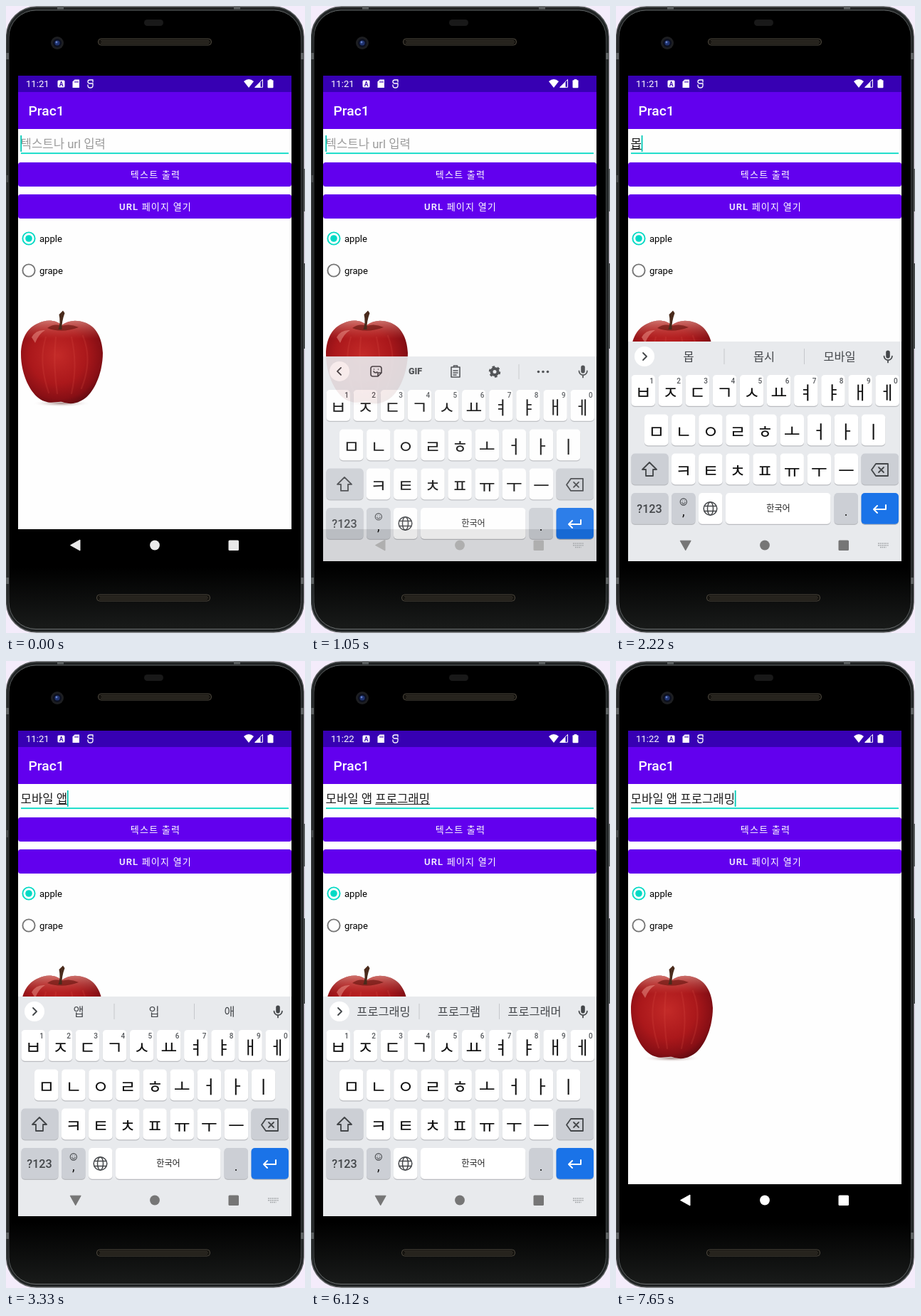
Recreate the animation shown at these times as an HTML page. Size 420 by 882 pixels, loop 8 s.

```html
<!DOCTYPE html>
<html lang="ko">
<head>
<meta charset="utf-8">
<style>
html, body { margin: 0; width: 100%; height: 100%; overflow: hidden; background: #f4ecfb; }
svg { display: block; width: 100%; height: 100%; }
text { font-family: Roboto, "Noto Sans CJK KR", "Noto Sans CJK", sans-serif; white-space: pre; }
.line { fill: none; stroke-linecap: round; stroke-linejoin: round; }
</style>
</head>
<body>
<svg id="stage" viewBox="0 0 420 882" preserveAspectRatio="none"></svg>
<script>
const LOOP = 8000;
const stage = document.getElementById('stage');
const INK = '#434649';

// ---- markup helpers
const rect = (x, y, w, h, fill, r = 0, more = '') =>
  `<rect x="${x}" y="${y}" width="${w}" height="${h}" rx="${r}" fill="${fill}" ${more}/>`;
const disc = (x, y, r, fill, more = '') => `<circle cx="${x}" cy="${y}" r="${r}" fill="${fill}" ${more}/>`;
const ring = (x, y, r, color, w) => disc(x, y, r, 'none', `stroke="${color}" stroke-width="${w}"`);
const line = (d, color = INK, w = 1.8, more = '') =>
  `<path class="line" d="${d}" stroke="${color}" stroke-width="${w}" ${more}/>`;
const shape = (d, fill, more = '') => `<path d="${d}" fill="${fill}" ${more}/>`;
const label = (x, y, size, str, fill = '#000', more = '') =>
  `<text x="${x}" y="${y}" font-size="${size}" fill="${fill}" ${more}>${str}</text>`;
const mid = (x, y, size, str, fill, more = '') => label(x, y, size, str, fill, `text-anchor="middle" ${more}`);
const stops = list => list.map(([at, color, alpha = 1]) =>
  `<stop offset="${at}" stop-color="${color}" stop-opacity="${alpha}"/>`).join('');

function grille(x, y) {
  let out = rect(x, y, 159, 9, '#15130f', 4, 'stroke="#4b463c"');
  for (let i = 0; i < 3; i++)
    out += `<path d="M${x + 4 + i % 2} ${y + 2.5 + i * 2}h151" stroke="#5a5448" stroke-dasharray="1 1"/>`;
  return out;
}

function phone() {
  let out = `<defs><linearGradient id="glass" x2="0" y2="1">${stops([[0, '#000'], [.9, '#000'], [1, '#191b1a']])}</linearGradient>
    <linearGradient id="rim" x2="0" y2="1">${stops([[0, '#5f6364'], [.06, '#3a3e3f'], [.94, '#3a3e3f'], [1, '#6a6e6e']])}</linearGradient></defs>`;
  out += rect(417, 229, 3, 60, '#6b6e70') + rect(417.5, 362, 2.5, 120, '#4b4e50');
  out += rect(.7, 1, 417.3, 880, '#202324', 42, 'stroke="url(#rim)" stroke-width="1.500"');
  out += rect(4, 6, 410.5, 870.5, 'url(#glass)', 38, 'stroke="url(#rim)" stroke-width="1"');
  for (const y of [66, 804]) out += rect(0, y, 4, 9, '#5d6162') + rect(414, y, 4, 9, '#5d6162');
  out += rect(0, 238, 3, 10, '#494d4e') + rect(72, 0.5, 9, 4, '#5d6162') + rect(320, 0.5, 9, 4, '#5d6162');
  out += rect(194, 19, 27, 9, '#191919', 4.5);
  out += disc(72, 52, 9, '#1d1e21') + disc(72, 52, 6, '#0c1020') + disc(72, 52, 3.6, '#20336f') + disc(71, 51, 1.4, '#6480c8');
  return out + grille(129.5, 46) + grille(127.5, 828);
}

function statusBar() {
  return rect(17, 98, 384, 23, '#3700b3') +
    label(28, 114, 13.1, '11:21', '#fff', 'id="clock"') +
    rect(72.5, 104.5, 10, 10, '#fff', 1.5) + mid(77.5, 112.7, 8.5, 'A', '#3700b3', 'font-weight="700"') +
    shape('M96.5 103.5h6.5v11.5h-9.5v-8.5z', '#fff') +
    '<path d="M97 105.500v2.500m2-2.500v2.500m2-2.500v2.500" stroke="#3700b3"/>' +
    line('M122 104h-4q-3 0-3 2.500t3 2.500h4v3q0 3-3.500 3t-3.500-3v-1M122 104v3', '#fff', 1.3) +
    shape('M334 106q7-6 14 0l-7 9z', '#fff') +
    line('M350 114.300h10.500v-10.500z', '#fff', 1) + shape('M349.500 115h8v-8z', '#fff') +
    rect(367.5, 104.3, 8, 11, '#fff', 1) + rect(369.7, 103, 3.6, 2, '#fff');
}

function button(y, str) {
  return rect(17, y, 384, 34, '#6200ee', 3.5) +
    mid(210, y + 22, 13.07, str, '#fff', 'font-weight="500" letter-spacing="1.17"');
}

function apple() {
  const body = 'M78 449C70 441 56 441 46 446C30 452 21 468 21 490C21 520 36 550 54 556C64 560 72 556 79 557C88 560 96 560 104 556C122 549 136 518 136 488C135 466 126 450 110 445C98 441 88 442 78 449Z';
  return `<defs><radialGradient id="skin" cx=".45" cy=".42" r=".62">
    ${stops([[0, '#c32a28'], [.55, '#ab181b'], [.85, '#880f15'], [1, '#600a10']])}</radialGradient>
    <linearGradient id="gloss" x2="0" y2="1">${stops([[0, '#f0b0a4', .6], [.22, '#e06a5c', 0]])}</linearGradient>
    <radialGradient id="shade">${stops([[0, '#8d6a66', .8], [1, '#fff', 0]])}</radialGradient></defs>` +
    '<ellipse cx="78" cy="559" rx="42" ry="5" fill="url(#shade)"/>' +
    shape(body, 'url(#skin)') + shape(body, 'url(#gloss)') +
    shape('M58 453Q78 461 102 452Q90 446 78 450Q68 446 58 453Z', '#6e1712', 'opacity=".7"') +
    shape('M36 466Q42 455 55 456Q46 461 41 474Z', '#f3a79b', 'opacity=".45"') +
    line('M56 466Q45 500 60 544M70 466Q66 505 72 545M92 466Q101 505 92 545M108 464Q122 498 106 538', '#dc5145', 2.2, 'opacity=".2"') +
    shape('M73.500 455Q77 445 74.500 434L80 428.500L82.500 432Q78 444 78.500 455Z', '#4a2b1c');
}

function app() {
  return rect(17, 121, 384, 615, '#fefefe') + statusBar() +
    rect(17, 121, 384, 52, '#6200ee') + label(31.6, 154.2, 19.2, 'Prac1', '#fff', 'font-weight="500"') +
    rect(21, 206.3, 376, 1.8, '#03dac5') +
    label(20.6, 200, 16.7, '', '#1c1c1c', 'id="field"') +
    rect(0, 201, 0, 1, '#1c1c1c', 0, 'id="under"') + rect(0, 182, 1.8, 23, '#03c9b6', 0, 'id="caret"') +
    button(220, '텍스트 출력') + button(265, 'URL 페이지 열기') +
    ring(32, 327, 8.6, '#03dac5', 1.9) + disc(32, 327, 4.8, '#03dac5') + label(47, 331.5, 13.07, 'apple') +
    ring(32, 372, 8.6, '#757575', 1.9) + label(47, 376.5, 13.07, 'grape') + apple();
}

function key(x, y, w, fill = '#fff') {
  return rect(x, y + 1, w, 44, '#b9bbbf', 5) + rect(x, y, w, 43.7, fill, 5);
}

function keyRow(x, y, letters, digits) {
  return [...letters].map((c, i) => {
    const left = x + i * 38.1;
    return key(left, y, 33.5) + mid(left + 16.8, y + 33.8, 25, c, '#111') +
      (digits ? mid(left + 28.5, y + 11.5, 10, (i + 1) % 10, '#55585c', 'font-weight="500"') : '');
  }).join('');
}

function keyboard() {
  const grey = '#cccfd5';
  const icons = line('M42 488l-5 5 5 5') +
    line('M87 486h9q3 0 3 3v6l-5 5h-7q-3 0-3-3v-8q0-3 3-3zM94 500v-5h5M88 493q2 3 5 1M88.500 490v0M94.500 490v0', INK, 1.6) +
    mid(146.5, 497.5, 12.5, 'GIF', INK, 'font-weight="900"') +
    line('M197 487h12v14h-12zM200.500 487v-2h5v2M200 492h6M200 495h6M200 498h4', INK, 1.6) +
    disc(258, 493.5, 4.5, 'none', `stroke="${INK}" stroke-width="4"`) +
    disc(258, 493.5, 7, 'none', `stroke="${INK}" stroke-width="2.500" stroke-dasharray="3.665"`) +
    rect(291.5, 483, 1, 21, '#c6c8cc') + [319.5, 326, 332.5].map(x => disc(x, 493.5, 1.8, INK)).join('');
  const bar = line('M38 488l5 5-5 5') + '<g id="words">' +
    rect(151.5, 482, 1, 22, '#c6c8cc') + rect(264, 482, 1, 22, '#c6c8cc') +
    [102, 208, 314].map(x => mid(x, 499.3, 16.4, '', '#45484c', 'class="word"')).join('') + '</g>';
  return rect(17, 472, 384, 330, '#e8eaed') + disc(40, 493, 14, '#fff') +
    `<g id="icons">${icons}</g><g id="bar">${bar}</g>` +
    rect(379.2, 484.5, 5.6, 11, INK, 2.8) + line('M376.500 492.500a5.700 5.700 0 0 0 11.400 0M382 498.500v3', INK, 1.7) +
    keyRow(21.5, 519, 'ㅂㅈㄷㄱㅅㅛㅕㅑㅐㅔ', true) + keyRow(40, 574.5, 'ㅁㄴㅇㄹㅎㅗㅓㅏㅣ') +
    keyRow(78, 629.5, 'ㅋㅌㅊㅍㅠㅜㅡ') +
    key(21.5, 629.5, 52, grey) + line('M47 642l-10 10h5v9h10v-9h5z') +
    key(344.5, 629.5, 52.5, grey) + line('M365 644h17v17h-17l-6-8.500zM369 649l7 7m0-7l-7 7') +
    key(21.5, 685, 52, grey) + mid(47, 713, 16.2, '?123', INK, 'font-weight="500"') +
    key(78, 685, 33.5, grey) + ring(94.8, 697.5, 4.6, INK, 1.1) +
    line('M92.500 698.500q2.300 3 4.600 0M93.200 696v0M96.400 696v0', INK, 1.1) + mid(94.8, 717, 18, ',', '#111') +
    key(116, 685, 33.5) + ring(132.5, 707, 9.3, INK, 1.5) +
    `<ellipse cx="132.500" cy="707" rx="4" ry="9.300" fill="none" stroke="${INK}" stroke-width="1.500"/>` +
    line('M124.500 703.500h16M124.500 710.500h16', INK, 1.5) +
    key(154, 685, 147.5) + mid(228, 711, 12.2, '한국어', '#222') +
    key(306.5, 685, 33.5, grey) + mid(323, 717, 18, '.', '#111') +
    key(344.5, 685, 52.5, '#1a73e8') + line('M379 702v6h-17m5-5l-5 5 5 5', '#fff', 2);
}

function navBar() {
  return rect(53, 736, 90, 45, '#000', 22, 'id="ripple"') + '<g id="nav">' +
    '<path id="back" d="M90.500 758.500L104 751v15z" stroke-width="1" stroke-linejoin="round"/>' +
    '<circle cx="209" cy="758.500" r="6.900"/><rect x="312.500" y="751.500" width="14.500" height="14.500" rx="1.500"/></g>' +
    '<path id="switch" d="M368 756h14.500M368 758.700h14.500M371 761.400h8.500" stroke="#9da0a3" stroke-width="1.500" stroke-dasharray="1.600 1"/>';
}

stage.innerHTML = phone() + '<clipPath id="screen"><rect x="17" y="98" width="384" height="683"/></clipPath>' +
  `<g clip-path="url(#screen)">${app()}<g id="keys">${keyboard()}</g>${navBar()}</g>`;

// ---- timeline: [time, text, composing start, suggestions]; * marks a bold word
const STEPS = [
  [0, '', 0, '||'],
  [1890, 'ㅁ', 0, 'ㅁ|마|무'],
  [2040, '모', 0, '모|뭐|못'],
  [2220, '몹', 0, '몹|몹시|모바일'],
  [2370, '모바', 0, '모바|모바일|모바일에서'],
  [2460, '모방', 0, '모방|모바일|모방하는'],
  [2580, '모바이', 0, '모바이|*모바일|모바일로'],
  [2970, '모바일', 0, '모바일|모바일로|모바일에서'],
  [3090, '모바일 ', 4, '게임|앱|버전'],
  [3180, '모바일 ㅇ', 4, 'ㅇ|이|아'],
  [3270, '모바일 애', 4, '애|얘|애들'],
  [3330, '모바일 앱', 4, '앱|입|애'],
  [3450, '모바일 앱 ', 6, '개발|설치|다운'],
  [3660, '모바일 앱 ㅍ', 6, 'ㅍ|표|포함'],
  [3750, '모바일 앱 프', 6, '프|프로|프리'],
  [3840, '모바일 앱 플', 6, '플|플랫폼|플레이'],
  [3990, '모바일 앱 프로', 6, '프로|프로그램|프로젝트'],
  [4170, '모바일 앱 프록', 6, '프록|프로그램|프로젝트'],
  [4230, '모바일 앱 프로그', 6, '프로그|*프로그램|프로젝트'],
  [4380, '모바일 앱 프로글', 6, '프로글|*프로그램|프로그'],
  [4470, '모바일 앱 프로그래', 6, '프로그래|*프로그램|프로그래밍'],
  [4560, '모바일 앱 프로그래미', 6, '프로그래미|*프로그래밍|프로그램'],
  [4650, '모바일 앱 프로그래밍', 6, '프로그래밍|프로그램|프로그래머'],
  [6750, '모바일 앱 프로그래밍', 11, '||']
];
const CARET_ON = [[0, 120], [630, 1100], [1560, 5130], [5640, 6120], [6630, 7140], [7650, LOOP]];
const SHOW = 855, HIDE = 6806;

const pen = document.createElement('canvas').getContext('2d');
function textWidth(str) {
  pen.font = '16.7px Roboto, "Noto Sans CJK KR", "Noto Sans CJK", sans-serif';
  return pen.measureText(str).width;
}

const clamp = v => Math.min(1, Math.max(0, v));

// Cubic ease with control points (x1, 0) and (x2, 1)
function ease(x, x1, x2) {
  let lo = 0, hi = 1, s = .5;
  for (let i = 0; i < 24; i++) {
    s = (lo + hi) / 2;
    const at = 3 * x1 * s * (1 - s) ** 2 + 3 * x2 * s * s * (1 - s) + s ** 3;
    if (at < x) lo = s; else hi = s;
  }
  return 3 * s * s * (1 - s) + s ** 3;
}

function track(t, points) {
  let [t0, v0] = points[0];
  for (const [t1, v1] of points) {
    if (t < t1) return v0 + (v1 - v0) * (t - t0) / (t1 - t0);
    [t0, v0] = [t1, v1];
  }
  return v0;
}

const el = Object.fromEntries([...stage.querySelectorAll('[id]')].map(e => [e.id, e]));
const words = stage.querySelectorAll('.word');
const set = (node, attrs) => { for (const k in attrs) node.setAttribute(k, attrs[k]); };

function drawText(t) {
  const [, text, from, hints] = STEPS.filter(s => s[0] <= t).pop();
  el.field.textContent = text || '텍스트나 url 입력';
  el.field.setAttribute('fill', text ? '#1c1c1c' : '#9b9b9b');
  const end = textWidth(text), start = textWidth(text.slice(0, from));
  set(el.under, { x: 20.6 + start, width: Math.max(0, end - start) });
  set(el.caret, { x: 20.3 + end, opacity: CARET_ON.some(([a, b]) => t >= a && t < b) ? 1 : 0 });
  hints.split('|').forEach((h, i) => {
    words[i].textContent = h.replace('*', '');
    words[i].setAttribute('font-weight', h[0] === '*' ? 700 : 400);
  });
  el.icons.setAttribute('opacity', t < 1890 ? 1 : 0);
  el.bar.setAttribute('opacity', t < 1890 ? 0 : 1);
  el.words.setAttribute('opacity', t < 6750 ? 1 : 0);
  el.clock.textContent = t < 4890 ? '11:21' : '11:22';
}

function drawKeyboard(t) {
  let shown, alpha;
  if (t < HIDE) {
    shown = ease(clamp((t - SHOW) / 285), .4, .2);
    alpha = t < SHOW ? 0 : shown ** 1.3;
  } else {
    const x = clamp((t - HIDE) / 200);
    shown = 1 - ease(x, .4, 1);
    alpha = clamp(1 - 1.65 * x);
  }
  set(el.keys, { transform: `translate(0 ${309 * (1 - shown)})`, opacity: alpha });
  el.switch.setAttribute('opacity', alpha > .5 ? alpha : 0);
}

function drawNav(t) {
  const tone = Math.round(track(t, [[0, 233], [450, 255], [840, 255], [930, 188], [1110, 168], [1230, 118], [6870, 118], [7140, 255]]));
  const color = `rgb(${tone},${tone},${tone})`;
  set(el.nav, { fill: color, stroke: 'none' });
  const turn = track(t, [[0, 0], [1095, 0], [1230, -90], [6870, -90], [7080, 0]]);
  set(el.back, { transform: `rotate(${turn} 97.700 758.500)`, stroke: color });
  const grow = track(t, [[0, 0], [6570, 0], [6720, 1]]);
  const fade = track(t, [[0, 0], [6570, 0], [6630, .09], [6870, .09], [7050, 0]]);
  set(el.ripple, { x: 98 - 45 * grow, width: 90 * grow, opacity: fade });
}

function frame(now) {
  const t = now % LOOP;
  drawText(t);
  drawKeyboard(t);
  drawNav(t);
  requestAnimationFrame(frame);
}
frame(0);
</script>
</body>
</html>
```
